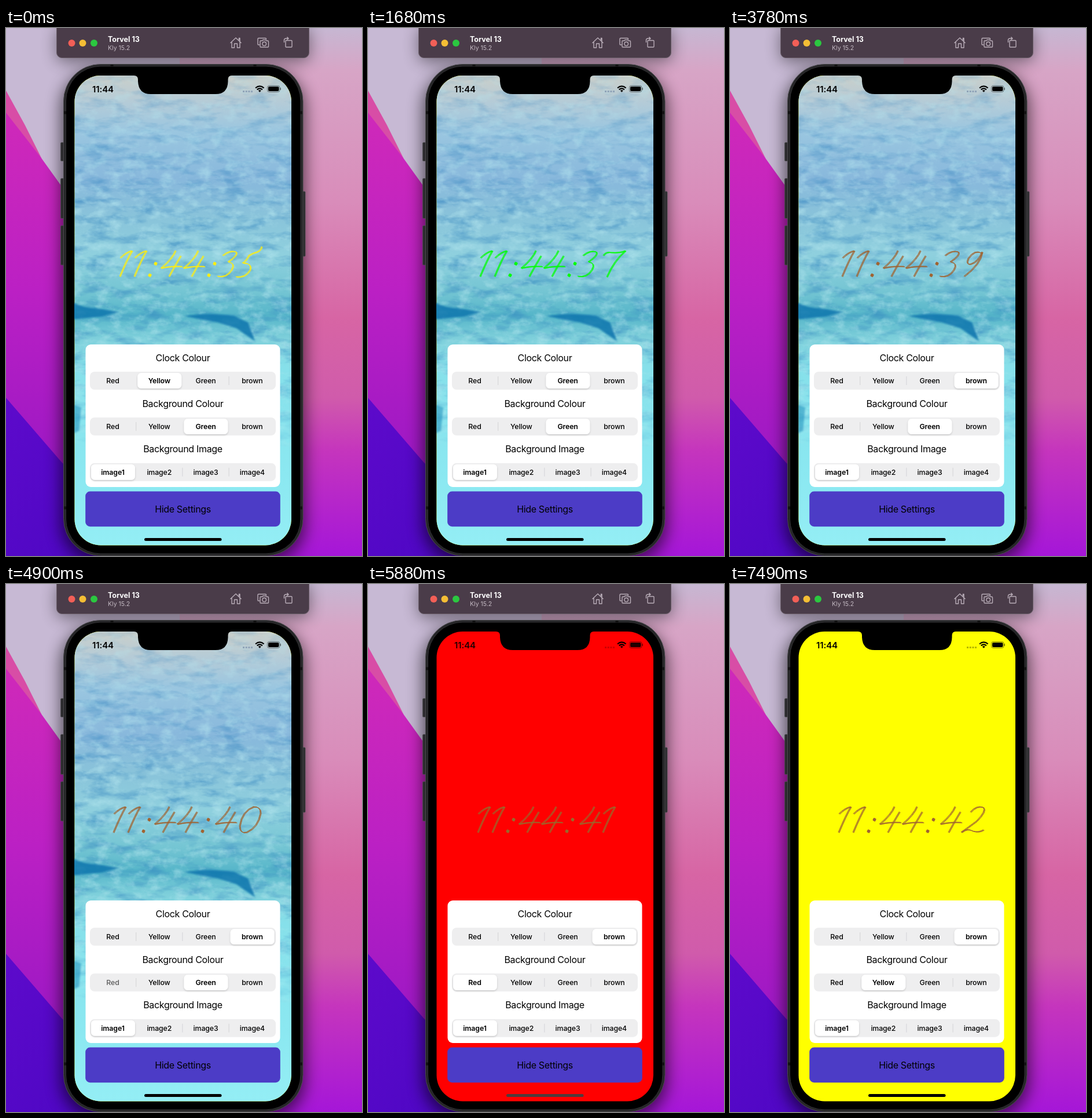
Recreate the animation shown at these times as an HTML page. Size 615 px wide and 911 px high, loop 8 s.

```html
<!DOCTYPE html>
<html lang="en">
<head>
<meta charset="utf-8">
<title>Clock settings</title>
<style>
html, body { margin: 0; width: 100%; height: 100%; overflow: hidden; }
svg { display: block; width: 615px; height: 911px; font-family: Inter, "Open Sans", sans-serif; }
.title { font-size: 16px; letter-spacing: -.33px; text-anchor: middle; }
.label { font-size: 12.3px; letter-spacing: -.1px; font-weight: 500; text-anchor: middle; }
</style>
</head>
<body>
<svg viewBox="0 0 615 911">
  <defs>
    <linearGradient id="right" x2="0" y2="1">
      <stop stop-color="#c6b7d2"/><stop offset=".08" stop-color="#d7a5c6"/>
      <stop offset=".33" stop-color="#d98cba"/><stop offset=".55" stop-color="#d765a4"/>
      <stop offset=".7" stop-color="#d05bab"/><stop offset=".8" stop-color="#c535bd"/>
      <stop offset="1" stop-color="#a516d8"/>
    </linearGradient>
    <linearGradient id="magenta" x2="0" y2="1">
      <stop stop-color="#cf29b9"/><stop offset=".4" stop-color="#bb20c4"/><stop offset="1" stop-color="#8d14c4"/>
    </linearGradient>
    <linearGradient id="violet" x2="1" y2="1">
      <stop stop-color="#5d0acb"/><stop offset="1" stop-color="#4a06c2"/>
    </linearGradient>
    <linearGradient id="sea" x2="0" y2="1">
      <stop stop-color="#cbcfca"/><stop offset=".06" stop-color="#b3cbd8"/>
      <stop offset=".12" stop-color="#9ac6e0"/><stop offset=".22" stop-color="#88b8dc"/>
      <stop offset=".3" stop-color="#89c3da"/><stop offset=".38" stop-color="#8fd0de"/>
      <stop offset=".46" stop-color="#74c5d3"/><stop offset=".51" stop-color="#55b5c9"/>
      <stop offset=".56" stop-color="#7fd0db"/><stop offset=".62" stop-color="#86e0ea"/>
      <stop offset=".85" stop-color="#8be8f1"/><stop offset="1" stop-color="#94eef5"/>
    </linearGradient>
    <linearGradient id="fade" x2="0" y2="1">
      <stop stop-color="#fff" stop-opacity=".5"/><stop offset=".25" stop-color="#fff"/>
      <stop offset=".6" stop-color="#fff"/><stop offset=".85" stop-color="#fff" stop-opacity=".1"/>
    </linearGradient>
    <filter id="dark" x="0" y="0" width="1" height="1" color-interpolation-filters="sRGB">
      <feTurbulence type="fractalNoise" baseFrequency=".022 .065" numOctaves="4" seed="7"/>
      <feColorMatrix values="0 0 0 0 .2  0 0 0 0 .52  0 0 0 0 .75  2.2 0 0 0 -1"/>
    </filter>
    <filter id="light" x="0" y="0" width="1" height="1" color-interpolation-filters="sRGB">
      <feTurbulence type="fractalNoise" baseFrequency=".045 .07" numOctaves="4" seed="3"/>
      <feColorMatrix values="0 0 0 0 .72  0 0 0 0 .91  0 0 0 0 .94  2.2 0 0 0 -1"/>
    </filter>
    <filter id="soft"><feGaussianBlur stdDeviation="1.5"/></filter>
    <filter id="shade" x="-20%" y="-50%" width="140%" height="200%"><feGaussianBlur stdDeviation="14"/></filter>
    <filter id="lift" x="-10%" y="-20%" width="120%" height="150%">
      <feDropShadow dx="0" dy="1.5" stdDeviation="1.5" flood-opacity=".18"/>
    </filter>
    <mask id="depth"><rect x="118" y="82" width="376" height="811" fill="url(#fade)"/></mask>
    <clipPath id="glass"><rect x="118.5" y="82" width="374.5" height="810.5" rx="45"/></clipPath>
  </defs>

  <!-- Wallpaper -->
  <rect width="615" height="911" fill="url(#right)"/>
  <path d="M0 0H300V600H0Z" fill="#c7b9d4"/>
  <path d="M0 108L33 168L62 226L0 150Z" fill="#d84da6"/>
  <path d="M0 146L60 223L96 273L180 400V911H0Z" fill="url(#magenta)"/>
  <path d="M0 638L96 749L260 911H0Z" fill="url(#violet)"/>
  <rect x="95" y="72" width="422" height="850" rx="66" opacity=".6" filter="url(#shade)"/>
  <rect x="88" y="0" width="436" height="58" rx="9" opacity=".45" filter="url(#shade)"/>

  <!-- Window bar -->
  <rect x="87.5" y="-10" width="436" height="61.5" rx="9" fill="#4a3c49" stroke="#6b5f6a"/>
  <circle cx="113.5" cy="26" r="6" fill="#f25f57"/>
  <circle cx="132.5" cy="26" r="6" fill="#f4be35"/>
  <circle cx="152" cy="26" r="6" fill="#2bc840"/>
  <text x="176" y="24" font-size="12.5" font-weight="700" fill="#fff">Torvel 13</text>
  <text x="176" y="37.5" font-size="10.5" fill="#c3b9c2">Kly 15.2</text>
  <g fill="none" stroke="#b9adb8" stroke-width="1.4" stroke-linejoin="round">
    <path d="M387.5 26L397 17L406.5 26M390 24V34H394.5V27H399.5V34H404V24M402.5 21V17.5H404V23"/>
    <path d="M438 29H436Q435 29 435 28V19Q435 17.5 436.5 17.5H448Q449.5 17.5 449.5 19V20"/>
    <path d="M440 22H442.5L444 20.5H448.5L450 22H452Q453.5 22 453.5 23.5V32Q453.5 33 452.5 33H440Q439 33 439 32V23Q439 22 440 22Z"/>
    <circle cx="446.2" cy="27.3" r="3.3"/>
    <rect x="483" y="21.5" width="11" height="11.5" rx="1"/>
    <path d="M480.5 25V21Q480.5 18 484 18H488M485.5 15.5L488 18L485.5 20.5"/>
  </g>

  <!-- Phone body -->
  <g fill="#2c2b2e" stroke="#505052" stroke-width=".8">
    <rect x="94.5" y="197.5" width="6" height="32" rx="1.5"/>
    <rect x="94.5" y="259.5" width="6" height="69" rx="1.5"/>
    <rect x="94.5" y="341" width="6" height="68" rx="1.5"/>
    <rect x="511" y="282" width="6" height="112" rx="1.5"/>
  </g>
  <rect x="99.5" y="62.5" width="413.5" height="848" rx="64" fill="#252527" stroke="#4a4a4d"/>
  <rect x="103.5" y="66" width="405.5" height="841" rx="60" stroke="#3c3c3e" stroke-width=".8"/>
  <path d="M100 146H104M100 828H104M508 146H512M508 828H512M183 63V66M430 63V66" stroke="#111" stroke-width="5"/>

  <!-- Screen -->
  <g clip-path="url(#glass)">
    <rect id="plain" x="118" y="82" width="376" height="811"/>
    <g id="photo">
      <rect x="118" y="82" width="376" height="811" fill="url(#sea)"/>
      <g mask="url(#depth)">
        <rect x="118" y="82" width="376" height="640" filter="url(#dark)" opacity=".6"/>
        <rect x="118" y="82" width="376" height="640" filter="url(#light)" opacity=".6"/>
      </g>
      <g fill="#0b75ad" filter="url(#soft)" opacity=".85">
        <path d="M112 472Q135 484 160 484L196 490L165 498L112 503Z"/>
        <path d="M308 497Q350 490 395 497L418 508L430 540L398 518L366 508Z"/>
        <path d="M116 650L130 655L126 695L116 700Z" opacity=".5"/>
      </g>
    </g>
  </g>
  <path d="M221 80V82Q228 82 228 89V92Q229 114 250 114H362Q383 114 383.5 92V89Q383.5 82 390 82V80Z"/>
  <g id="status">
    <text x="149" y="111" font-size="15" font-weight="600" letter-spacing="-.1">11:44</text>
    <path id="dots" d="M409 109.5H426" stroke-width="3" stroke-dasharray="3 1.7"/>
    <path d="M431 103.5Q438.3 97.3 445.6 103.5M433.7 106.3Q438.3 102.3 442.9 106.3" fill="none" stroke="#000" stroke-width="2.2"/>
    <path d="M435.8 108Q438.3 106 440.8 108L438.3 110.8Z"/>
    <rect x="451.5" y="99.5" width="21.5" height="11" rx="3.3" fill="none" stroke="#000" stroke-opacity=".45"/>
    <rect x="453" y="101" width="18.5" height="8" rx="2"/>
    <path d="M474.3 103V107" stroke="#000" stroke-opacity=".5" stroke-width="1.4"/>
  </g>

  <g id="clock" role="img" fill="none" stroke-width=".8" stroke-linecap="round" stroke-linejoin="round">
    <g id="digits"></g>
    <use href="#digits" x=".7" y=".4"/><use href="#digits" x="1.4" y=".8"/><use href="#digits" x="2.1" y="1.2"/>
  </g>

  <rect x="137.5" y="546" width="336" height="246" rx="9" fill="#fff"/>
  <g id="rows"></g>
  <rect x="137.2" y="799.6" width="336.6" height="60.6" rx="8" fill="#4c3cc6"/>
  <text class="title" x="305.5" y="836">Hide Settings</text>
  <rect id="home" x="239" y="880" width="133.5" height="5" rx="2.5"/>
</svg>

<script>
const LOOP = 8000, STEP = 70, SLIDE = 300;
const $ = id => document.getElementById(id);

const colours = ['Red', 'Yellow', 'Green', 'brown'];
const rows = [
  { title: 'Clock Colour', y: 593, labels: colours, start: 1 },
  { title: 'Background Colour', y: 672, labels: colours, start: 2 },
  { title: 'Background Image', y: 750.7, labels: ['image1', 'image2', 'image3', 'image4'], start: 0 }
];
const taps = [
  { at: 1120, row: 0, from: 1, to: 2 },
  { at: 2870, row: 0, from: 2, to: 3 },
  { at: 4970, row: 1, from: 2, to: 0 },
  { at: 7140, row: 1, from: 0, to: 1 }
];
const ticks = [630, 1680, 2730, 3780, 4830, 5880, 7000];
const ink = ['#f00', '#ffee10', '#0f0', '#a06432'];

// Pen strokes of each digit, and the left edge of the clock by its last digit
const glyphs = [
  'M28 1Q8 8 4 34Q4 48 16 45Q36 36 40 12Q40 0 28 1',
  'M3 13Q13 3 23 1Q14 16 2 45',
  'M14 10Q24 -2 36 2Q42 8 24 26L-2 45Q8 37 18 43Q28 46 36 41',
  'M10 9Q22 -1 33 3Q36 9 19 20Q32 22 25 34Q16 48 1 45',
  'M25 1Q20 14 0 31Q16 27 36 28M34 10Q24 26 14 45',
  'M22 9Q16 20 11 22Q28 22 24 34Q16 48 0 46M22 9Q28 5 36 3Q43 0 44 -6',
  'M56 -12Q18 4 8 32Q6 46 16 45Q30 40 30 28Q24 20 10 34',
  'M12 9Q16 2 26 4Q40 5 50 1Q30 18 18 46',
  'M40 6Q28 -3 18 8Q16 16 24 24Q32 34 20 44Q8 48 8 36Q12 26 28 18Q42 10 40 6',
  'M40 5Q28 -2 17 14Q12 26 21 24Q34 20 41 3Q38 24 10 45'
];
const edges = [183, 187, 185, 191, 191, 194, 192, 191, 191, 191];
const colon = 'M10 22L9 24M0 42L-1 44';

$('rows').innerHTML = rows.map(({ title, y, labels }) => `
  <text class="title" x="305.5" y="${y - 18.5}">${title}</text>
  <rect x="145" y="${y}" width="321" height="31" rx="8" fill="#eeeeef"/>
  ${[1, 2, 3].map(i => `<path class="line" d="M${144.5 + 80.2 * i} ${y + 8}v15" stroke="#d3d3d6"/>`).join('')}
  <rect class="thumb" y="${y + 2}" width="76" height="27" rx="6.5" fill="#fff" filter="url(#lift)"/>
  ${labels.map((s, i) => `<text class="label" x="${184.5 + 80.3 * i}" y="${y + 19.8}">${s}</text>`).join('')}
`).join('');
const all = name => [...document.querySelectorAll(name)];
const thumbs = all('.thumb'), lines = all('.line'), labels = all('.label');

function drawRow(row, r, t) {
  let from = row.start, to = row.start, p = 1, pressed = -1, dim = 1;
  for (const tap of taps) {
    if (tap.row !== r || t < tap.at - STEP) continue;
    pressed = tap.to;
    if (t < tap.at) {
      dim = .62;
      continue;
    }
    ({ from, to } = tap);
    const u = Math.min(1, (t - tap.at + 50) / SLIDE);
    p = 1 - (1 - u) ** 2.2;
    dim = Math.min(1, .68 + .4 * p);
  }
  thumbs[r].setAttribute('x', 147 + 80.2 * (from + (to - from) * p));
  const shown = (sel, i) => i === sel || i === sel + 1 ? 0 : 1;
  for (let i = 0; i < 4; i++) {
    const label = labels[r * 4 + i];
    label.style.fontWeight = i === (p < .5 ? from : to) ? 600 : 500;
    label.style.opacity = i === pressed ? dim : 1;
    if (i) lines[r * 3 + i - 1].style.opacity = shown(from, i) * (1 - p) + shown(to, i) * p;
  }
  return to;
}

let lastSecond;
function drawTime(second) {
  if (second === lastSecond) return;
  lastSecond = second;
  const tens = Math.floor(second / 10), unit = second % 10, x = edges[unit];
  const parts = [
    [glyphs[1], 0], [glyphs[1], 25], [colon, 54], [glyphs[4], 73], [glyphs[4], 112], [colon, 156],
    [glyphs[tens], tens === 4 ? 178 : 170], [glyphs[unit], tens === 4 ? 216 : 203]
  ];
  $('digits').innerHTML = parts.map(([d, dx]) =>
    `<path d="${d}" transform="translate(${x + dx} 383)"${d === colon ? ' stroke-width="3"' : ''}/>`).join('');
  $('clock').setAttribute('aria-label', '11:44:' + second);
}

function frame(now) {
  const t = Math.floor(now % LOOP / STEP) * STEP;
  const [clockColour, ground] = rows.map((row, r) => drawRow(row, r, t));
  const isPhoto = ground === 2, isRed = ground === 0;
  drawTime(35 + ticks.filter(at => t >= at).length);
  $('clock').setAttribute('stroke', isRed ? '#996a2c' : ink[clockColour]);
  $('photo').style.display = isPhoto ? '' : 'none';
  $('plain').setAttribute('fill', isRed ? '#f00' : '#ff0');
  $('dots').setAttribute('stroke', isPhoto ? '#8fa3b8' : isRed ? '#c00' : '#b5b500');
  $('status').setAttribute('fill', isRed ? '#200' : '#000');
  $('home').setAttribute('fill', isRed ? '#4f3c3c' : '#000');
  requestAnimationFrame(frame);
}
frame(performance.now());
</script>
</body>
</html>
```
